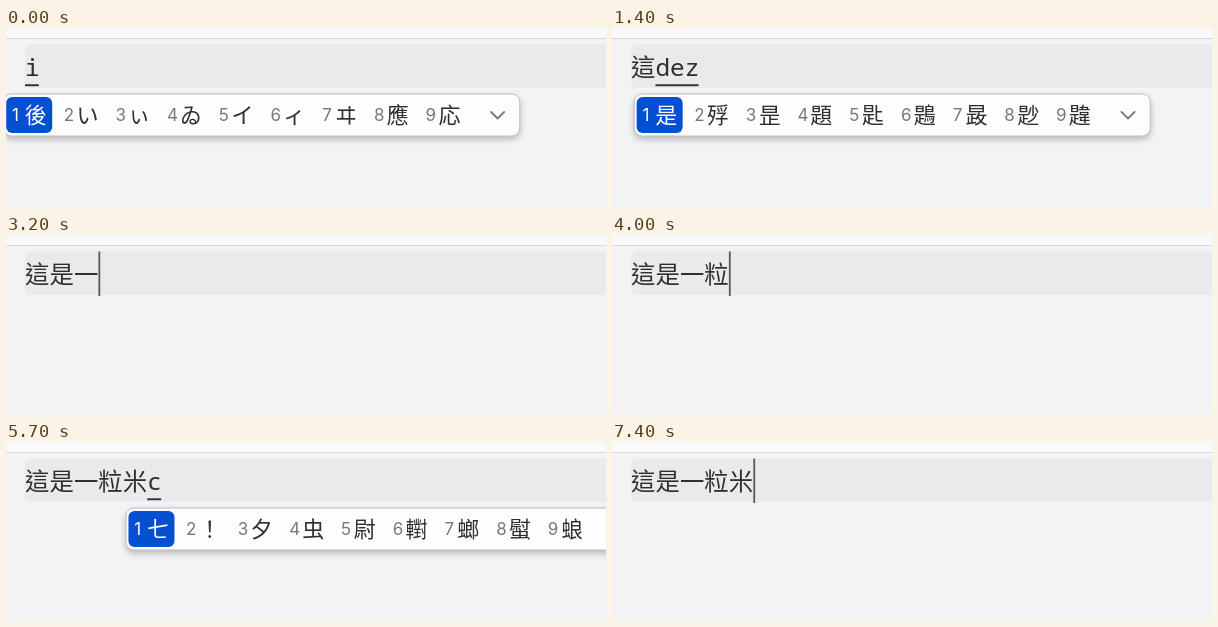
Animation of 600 by 179 pixels, one loop 8000 ms. Source, as an HTML page:

```html
<!DOCTYPE html>
<html lang="zh-TW">
<head>
<meta charset="utf-8">
<style>
  html, body { margin: 0; width: 100%; height: 100%; overflow: hidden; background: #f3f2f5; }
  svg { display: block; }
  text { fill: #2f2e31; white-space: pre; }
  .han { font: 24.4px "Noto Sans CJK TC", sans-serif; }
  .code { font: 500 24.4px "Noto Sans Mono", monospace; }
  .num { font: 17px Inter, sans-serif; fill: #77767a; }
  .pick { font: 22px "Noto Sans CJK TC", sans-serif; }
  .on text { fill: #fff; }
  .panel { fill: #fdfcfe; stroke: #bfbec1; filter: drop-shadow(0 3px 3px rgba(0,0,0,.24)); }
</style>
</head>
<body>
<svg width="600" height="179">
  <rect width="600" height="10" fill="#f9f8fa"/>
  <rect y="10" width="600" height="1" fill="#d8d7da"/>
  <rect x="19" y="16.5" width="620" height="43.5" rx="6" fill="#eae9eb"/>
  <g id="view"></g>
</svg>
<script>
const LOOP = 8000, LEFT = 19, EM = 24.45, CELL = 14.64, PITCH = 51.7;
const view = document.getElementById('view');

// Candidates offered for each code
const picks = {
  i: '後いぃゐイィヰ應応',
  ie: '立これコレ言音辛意',
  iee: '這言信訁誩',
  d: '日だダ曰旦昌晶早旱',
  de: '旦でデ亘昜量晨曇暈',
  dez: '是殍昰題匙鶗晸尟韙',
  e: '一えぇゑエェヱ二三',
  m: '木もモ目本末未林森',
  mu: '米むム粉粗糊糕糖粽',
  mun: '粒粘粕粟粱',
  c: '七！夕虫尉轛螂螱蜋',
  cr: '外らラ名多夙蚣蛉蛤',
  crn: '蝦蚓蛇蛙蜂',
};

// Start time, committed text, typed code ('|' shows the caret), code of the open panel
const steps = [
  [0, '', 'i', 'i'], [100, '', 'ie', 'i'], [200, '', 'ie', 'ie'],
  [400, '', 'iee', 'ie'], [500, '', 'iee', 'iee'], [700, '這', '|'],
  [900, '這', 'd'], [1000, '這', 'd', 'd'], [1100, '這', 'de', 'd'],
  [1200, '這', 'de', 'de'], [1300, '這', 'dez', 'de'], [1400, '這', 'dez', 'dez'],
  [1600, '這是', '|'], [2000, '這是', 'e', 'e'], [2100, '這是一', '|'],
  [2600, '這是一', ''], [3200, '這是一', '|'],
  [3400, '這是一', 'm'], [3500, '這是一', 'm', 'm'], [3600, '這是一', 'mu', 'm'],
  [3700, '這是一', 'mu', 'mu'], [3800, '這是一', 'mun', 'mu'], [3900, '這是一', 'mun', 'mun'],
  [4000, '這是一粒', '|'],
  [4300, '這是一粒', 'm'], [4400, '這是一粒', 'm', 'm'], [4500, '這是一粒', 'mu', 'm'],
  [4600, '這是一粒', 'mu', 'mu'], [4700, '這是一粒米', '|'], [5300, '這是一粒米', ''],
  [5700, '這是一粒米', 'c', 'c'], [5800, '這是一粒米', 'cr', 'c'], [5900, '這是一粒米', 'cr', 'cr'],
  [6000, '這是一粒米', 'crn', 'cr'], [6100, '這是一粒米', 'crn', 'crn'],
  [6200, '這是一粒米', 'cr', 'crn'], [6300, '這是一粒米', 'cr', 'cr'],
  [6400, '這是一粒米', 'c', 'cr'], [6500, '這是一粒米', 'c', 'c'],
  [6600, '這是一粒米', '|'], [6700, '這是一粒米', 'c'], [6800, '這是一粒米', 'c', 'c'],
  [6900, '這是一粒米', 'ce', 'c'], [7000, '這是一粒米', 'ce'], [7400, '這是一粒米', '|'],
];

const label = (cls, x, y, s) => `<text class="${cls}" x="${x}" y="${y}">${s}</text>`;
const box = (x, y, w, h, rest) => `<rect x="${x}" y="${y}" width="${w}" height="${h}" ${rest}/>`;

function panel(x, list) {
  const full = list.length === 9;
  const width = list.length * PITCH + (full ? 50.7 : -0.5);
  const items = [...list].map((c, i) => {
    const left = x + 8.2 + i * PITCH;
    return `<g class="${i ? '' : 'on'}">${label('num', left, 93.2, i + 1)}${label('pick', left + 12.8, 95.3, c)}</g>`;
  });
  const arrow = `<path d="M${x + 487.3} 84l6.5 6.5 6.5-6.5" fill="none" stroke="#7c7b7f" stroke-width="1.9" stroke-linecap="round" stroke-linejoin="round"/>`;
  return box(x, 66, width, 42, 'rx="8" class="panel"')
    + box(x + 2.4, 69, 46, 36, 'rx="6" fill="#0550d0"')
    + items.join('') + (full ? arrow : '');
}

function draw([, text, typed, open]) {
  const x = LEFT + text.length * EM;
  let out = [...text].map((c, i) => label('han', LEFT + i * EM, 48.2, c)).join('');
  if (typed === '|') out += box(x + 0.1, 16.5, 1.8, 44.5, 'fill="#59585b"');
  else if (typed) out += label('code', x, 48, typed)
    + box(x, 56.3, typed.length * CELL - 0.8, 1.9, 'fill="#2f2e31"');
  if (open) out += panel(x - 21.2, picks[open]);
  view.innerHTML = out;
}

let shown;
function tick() {
  const t = performance.now() % LOOP;
  const step = steps.findLast(s => s[0] <= t);
  if (step !== shown) draw(shown = step);
  requestAnimationFrame(tick);
}
tick();
</script>
</body>
</html>
```
